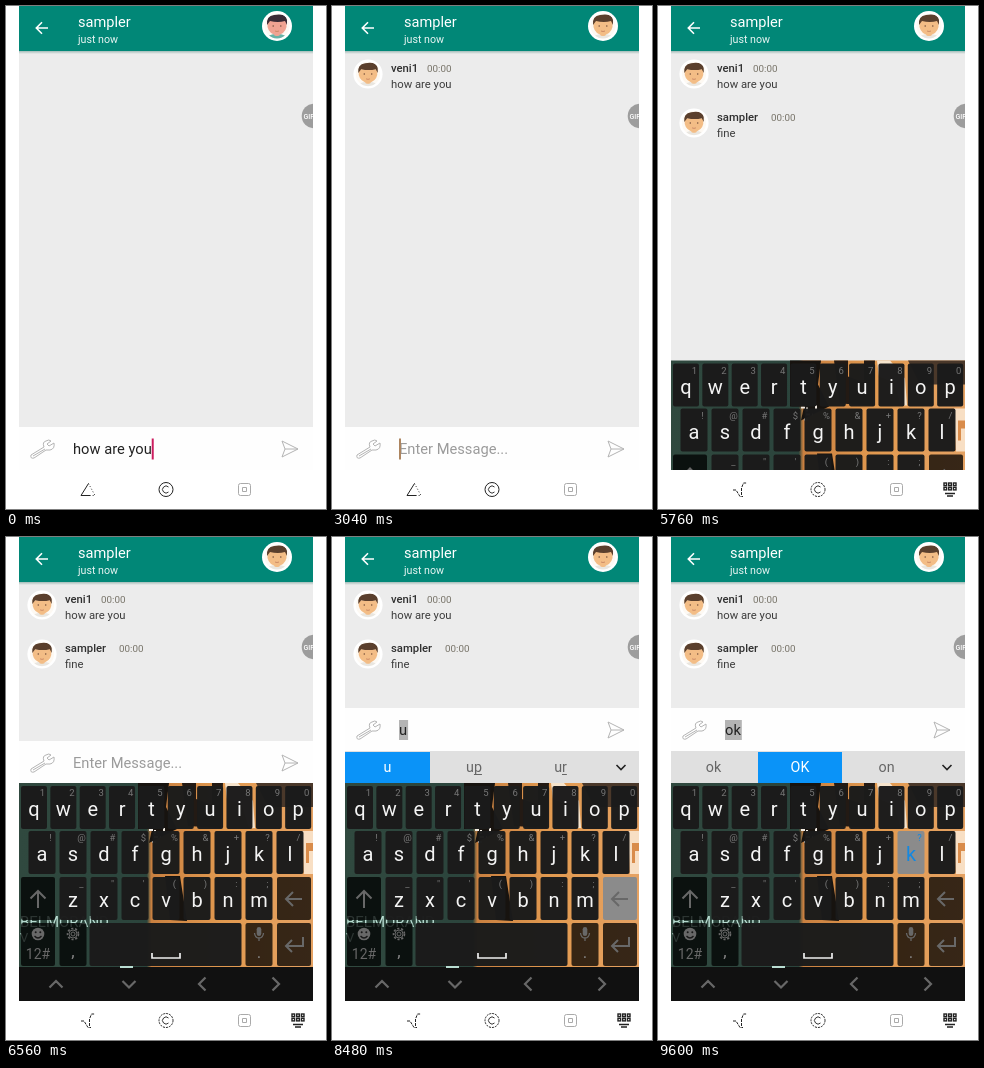
Animation of 320x503 px, one loop 9.76 s. Source, as an HTML page with a canvas:

```html
<!DOCTYPE html>
<html lang="en">
<head>
<meta charset="utf-8">
<title>Chat</title>
<style>
  html, body { margin: 0; width: 100%; height: 100%; overflow: hidden; background: #fff; }
  canvas { display: block; width: 320px; height: 503px; }
</style>
</head>
<body>
<canvas id="stage"></canvas>
<script>
const LOOP = 9760, LEFT = 13, RIGHT = 307, WIDTH = RIGHT - LEFT;
const BLUE = '#0a93f8';
const canvas = document.getElementById('stage');
const scale = window.devicePixelRatio || 1;
canvas.width = 320 * scale;
canvas.height = 503 * scale;
const c = canvas.getContext('2d');

// Each step changes only the listed properties.
const STEPS = [
  [0, { text: 'how are you', cursor: true, warm: true, messages: 0, composing: false,
        keyboard: 0, resized: false, strip: false, words: null, pick: 0, popup: '', pressed: '' }],
  [320, { cursor: false, warm: false }],
  [800, { cursor: true, warm: true }],
  [1120, { text: '', messages: 1, warm: false }],
  [1600, { cursor: false }],
  [2080, { cursor: true }],
  [2560, { cursor: false }],
  [3040, { cursor: true }],
  [3520, { cursor: false }],
  [4000, { cursor: true, messages: 2 }],
  [4480, { cursor: false }],
  [4960, { cursor: true }],
  [5440, { cursor: false }],
  [5760, { keyboard: 0.5 }],
  [5920, { keyboard: 1 }],
  [6080, { resized: true, cursor: true }],
  [6560, { cursor: false }],
  [7040, { popup: 'u', cursor: true }],
  [7200, { popup: '', pressed: 'u', text: 'u', composing: true, strip: true, words: ['u', 'up', 'ur'] }],
  [7360, { pressed: '' }],
  [8160, { cursor: false }],
  [8480, { pressed: 'back' }],
  [8640, { pressed: '', text: '', composing: false, words: null, cursor: true }],
  [9120, { popup: 'o', cursor: false }],
  [9280, { popup: '', pressed: 'o', text: 'o', composing: true, words: ['o', 'of', 'on'], cursor: true }],
  [9440, { pressed: '', popup: 'k' }],
  [9600, { popup: '', pressed: 'k', text: 'ok', words: ['ok', 'OK', 'on'], pick: 1, cursor: false }]
];

function rect(x, y, w, h, fill, radius = 0) {
  c.fillStyle = fill;
  c.beginPath();
  c.roundRect(x, y, w, h, radius);
  c.fill();
}

function circle(x, y, r, fill) {
  c.fillStyle = fill;
  c.beginPath();
  c.arc(x, y, r, 0, 2 * Math.PI);
  c.fill();
}

function label(text, x, baseline, size, fill, align = 'left', weight = 400) {
  c.font = `${weight} ${size}px Roboto, sans-serif`;
  c.textAlign = align;
  c.fillStyle = fill;
  c.fillText(text, x, baseline);
}

function stroke(path, color, width = 1, dash = []) {
  c.setLineDash(dash);
  c.strokeStyle = color;
  c.lineWidth = width;
  c.stroke(new Path2D(path));
  c.setLineDash([]);
}

function fillPath(path, color) {
  c.fillStyle = color;
  c.fill(new Path2D(path));
}

function at(x, y, size, paint) {
  c.save();
  c.translate(x, y);
  c.scale(size, size);
  paint();
  c.restore();
}

function avatar(x, y, r, warm) {
  circle(x, y, r, '#fff');
  at(x, y, r / 15, () => {
    const skin = warm ? '#f0a392' : '#f3bd86';
    c.beginPath();
    c.arc(0, 0, 12.5, 0, 7);
    c.clip();
    rect(-13, -13, 26, 26, '#fdf9f3');
    fillPath('M-11 13Q-9 8 0 8Q9 8 11 13Z', warm ? '#67b3a8' : '#e9e6e0');
    rect(-3, 5, 6, 5, skin, 2);
    fillPath('M-9.5-5H9.5V1Q8 8 0 9Q-8 8-9.5 1Z', skin);
    fillPath('M-10-1Q-11-10-3-11Q9-13 10-6L10-1L8-5Q1-3-7-5Z', warm ? '#392a35' : '#5a3f2d');
    circle(-3.8, 0, 0.8, '#75503b');
    circle(3.8, 0, 0.8, '#75503b');
    stroke('M-2 5Q0 6 2 5', '#c98663', 0.9);
  });
}

function header(warm) {
  rect(LEFT, 0, WIDTH, 45, '#018777');
  const shadow = c.createLinearGradient(0, 45, 0, 48);
  shadow.addColorStop(0, '#a3bcb8');
  shadow.addColorStop(1, '#ececec');
  rect(LEFT, 45, WIDTH, 3, shadow);
  stroke('M42 22H30.5M36 16.3L30.3 22L36 27.7', '#fff', 1.6);
  label('sampler', 72, 21, 14.6, '#fff');
  label('just now', 72, 37, 10.7, '#e9f5f3');
  avatar(271, 20, 15, warm);
}

function message(y, name, timeX, text) {
  avatar(36, y, 14.6, false);
  label(name, 59, y - 2, 11.3, '#303030', 'left', 500);
  label('00:00', timeX, y - 2, 9.8, '#777368');
  label(text, 59, y + 14, 11.3, '#3c3c3c');
}

function recorderBubble() {
  c.save();
  c.beginPath();
  c.rect(LEFT, 90, WIDTH, 40);
  c.clip();
  circle(308, 110, 12.3, '#9d9d9d');
  label('GIF', 297.5, 112.7, 7, '#fff', 'left', 500);
  c.restore();
}

function inputBar(s, top) {
  rect(LEFT, top, WIDTH, 43, '#fefefe');
  const mid = top + 22;
  at(36, mid, 1, () =>
    stroke('M-11 6L2-2Q0-7 4-8Q7-10 9-8L5-5L7-3L12-6Q13 0 8 1L4 1L-8 9Q-12 10-11 6ZM-9 7L3 0', '#b4b4b4'));
  at(283, mid, 1, () => stroke('M-7-8L9 0L-7 8L-4 0ZM-4 0H9', '#b4b4b4'));
  c.font = '400 14.7px Roboto, sans-serif';
  const width = c.measureText(s.text).width;
  if (s.composing) rect(67, mid - 10, width + 1, 20, '#b4b4b4');
  if (s.text) label(s.text, 67, mid + 5, 14.7, '#222');
  else label('Enter Message...', 67, mid + 5, 14.7, '#9b9b9b');
  if (s.cursor) {
    const x = s.text ? 67 + width : 67;
    rect(x, mid - 10.5, 2, 21, s.warm ? '#cc1d5f' : '#ad8560');
  }
}

// Key geometry: name, centre x, top y, width, hint
const keys = [];
function addRow(letters, hints, first, pitch, top, width) {
  [...letters].forEach((name, i) =>
    keys.push({ name, x: first + i * pitch, y: top, w: width, hint: hints[i] }));
}
addRow('qwertyuiop', '1234567890', 28, 29.35, 249, 26);
addRow('asdfghjkl', '!@#$%&+?/', 36, 31, 294, 27);
addRow('zxcvbnm', '_"\'():;', 67, 31, 340, 27);
for (const [name, x, y, w] of [['shift', 32, 340, 34], ['back', 288, 340, 34], ['symbols', 32, 386, 34],
  ['comma', 67, 386, 27], ['space', 159.5, 386, 152], ['dot', 253, 386, 27], ['enter', 288, 386, 34]]) {
  keys.push({ name, x, y, w });
}

function wallpaper() {
  const base = c.createLinearGradient(LEFT, 0, RIGHT, 0);
  base.addColorStop(0, '#30493f');
  base.addColorStop(0.435, '#2b443c');
  base.addColorStop(0.45, '#c98040');
  base.addColorStop(0.7, '#e29a50');
  base.addColorStop(1, '#e5a263');
  rect(LEFT, 246, WIDTH, 184, base);
  fillPath('M132 246H163L160 270L171 292L143 306L146 292H132Z', '#17130f');
  fillPath('M176 246H190V262L206 268V246H217L215 291L182 289Z', '#231a14');
  fillPath('M219 246H232L247 264L249 291H243L236 268L221 262Z', '#f6e4cd');
  fillPath('M250 246H307V270H262Z', '#4a382a');
  stroke('M143 293H149V300H155M146 305H151M158 291V296', '#f2ece4', 2, [4, 2]);
  fillPath('M296 294H307V337H298Z', '#f8dfc4');
  fillPath('M300 306H307V314H303V326H300Z', '#d98c4b');
  fillPath('M159 339H174L181 384L164 383Z', '#17130f');
  label('BELMORAND', 14, 390, 15, '#b9ddd2');
  label('V', 14, 405, 13, '#b9ddd2');
}

function keyIcons() {
  const gray = '#686868';
  stroke('M32 371V354M24.5 361.5L32 354L39.5 361.5', gray, 2);
  stroke('M296 362H280M287 355L280 362L287 369', gray, 2);
  stroke('M297 400V409H280M286 403L280 409L286 415', gray, 2);
  circle(32, 397, 6.3, gray);
  circle(29.7, 395.3, 1, '#181818');
  circle(34.3, 395.3, 1, '#181818');
  stroke('M28.5 399Q32 403 35.5 399', '#181818', 1.3);
  label('12#', 32, 422, 14, gray, 'center');
  stroke('M72.5 397A5.5 5.5 0 1 1 61.5 397A5.5 5.5 0 1 1 72.5 397', gray, 1.6, [2.2, 1.7]);
  stroke('M71 397A4 4 0 1 1 63 397A4 4 0 1 1 71 397M69 397A2 2 0 1 1 65 397A2 2 0 1 1 69 397', gray);
  label(',', 67, 420, 17, '#888', 'center');
  stroke('M146 416V421H174V416', '#eee', 1.7);
  rect(250.7, 390, 4.6, 9, gray, 2.3);
  stroke('M248.5 396Q249 401 253 401Q257 401 257.5 396M253 401V404', gray, 1.3);
  label('.', 253, 421, 17, '#888', 'center');
}

function keyFill(key, pressed) {
  if (pressed) return '#8b8b8b';
  return key.hint || key.name === 'space' ? 'rgba(27,27,27,.98)' : 'rgba(0,0,0,.76)';
}

function keyboard(s) {
  c.save();
  c.beginPath();
  c.rect(LEFT, 200, WIDTH, 264);
  c.clip();
  c.translate(0, (1 - s.keyboard) * 217);
  wallpaper();
  for (const k of keys) {
    const pressed = k.name === s.pressed;
    rect(k.x - k.w / 2, k.y, k.w, 43, keyFill(k, pressed), 2);
    if (k.hint) {
      label(k.name, k.x, k.y + 30, 20, pressed ? '#1488e0' : '#f4f4f4', 'center');
      label(k.hint, k.x + 8.5, k.y + 10, 9.5, pressed ? '#1488e0' : '#777', 'center');
    }
  }
  keyIcons();
  rect(LEFT, 430, WIDTH, 34, '#111');
  rect(114, 429, 13, 2, '#b9ddd2');
  stroke('M43.5 450.5L50 444L56.5 450.5M116.5 444L123 450.5L129.5 444M199.5 440.5L193 447L199.5 453.5' +
    'M266.5 440.5L273 447L266.5 453.5', '#686868', 2.2);
  c.restore();
}

function suggestions(s) {
  rect(LEFT, 214, WIDTH, 32, '#e0e0e0');
  if (!s.words) return;
  const cells = [[13, 85], [100, 84], [186, 85]];
  s.words.forEach((word, i) => {
    const [x, w] = cells[i], mid = x + w / 2, active = i === s.pick;
    if (active) rect(x, 215, w, 31, BLUE);
    label(word, mid, 235, 14.3, active ? '#fff' : '#666', 'center');
    if (s.text === 'u' && i) {
      const full = c.measureText(word).width, start = c.measureText('u').width;
      rect(mid - full / 2 + start, 237, full - start, 1, '#666');
    }
  });
  stroke('M284.5 228L289 232.5L293.5 228', '#222', 1.6);
}

function popup(name) {
  const key = keys.find(k => k.name === name);
  if (!key) return;
  rect(key.x - 22, key.y - 65, 44.5, 57, '#6b6b6b', 2);
  label(name, key.x, key.y - 25, 27, '#fff', 'center');
}

function navigation(open) {
  rect(LEFT, 464, WIDTH, 39, '#fff');
  if (open) {
    stroke('M75 484H78L82 490.5H85M83.5 489V482L85.5 477H89', '#222', 1, [3, 1]);
    for (let i = 0; i < 3; i++) {
      for (let j = 0; j < 2; j++) {
        c.lineWidth = 1.4;
        c.strokeStyle = '#222';
        c.strokeRect(286 + i * 4.7, 477 + j * 4.3, 2.6, 2.6);
      }
    }
    stroke('M287 487.5H297M289 490H295', '#222', 1.6);
  } else {
    stroke('M82.5 477.5L75 489.5H84', '#222');
    stroke('M82.5 477.5L89 489.5H84', '#333', 1, [1, 2]);
  }
  stroke('M167 483.5A7 7 0 1 1 153 483.5A7 7 0 1 1 167 483.5', '#222', 1, open ? [2, 1] : []);
  stroke('M162.5 481A3.5 3.5 0 1 0 162.5 486', '#333');
  c.strokeStyle = '#aaa';
  c.beginPath();
  c.roundRect(232.5, 477.5, 12, 12, 2);
  c.rect(236.5, 481.5, 4, 4);
  c.stroke();
}

function draw(s) {
  c.setTransform(scale, 0, 0, scale, 0, 0);
  rect(0, 0, 320, 503, '#fff');
  const barTop = s.strip ? 171 : s.resized ? 204 : 421;
  rect(LEFT, 45, WIDTH, barTop - 45, '#ececec');
  header(s.warm);
  if (s.messages > 0) message(68, 'veni1', 95, 'how are you');
  if (s.messages > 1) message(117, 'sampler', 113, 'fine');
  recorderBubble();
  inputBar(s, barTop);
  if (s.keyboard) keyboard(s);
  if (s.strip) suggestions(s);
  popup(s.popup);
  navigation(s.keyboard > 0);
}

function stateAt(time) {
  return Object.assign({}, ...STEPS.filter(([start]) => start <= time).map(([, change]) => change));
}

const begin = performance.now();
function tick() {
  draw(stateAt((performance.now() - begin) % LOOP));
  requestAnimationFrame(tick);
}
tick();
</script>
</body>
</html>
```
